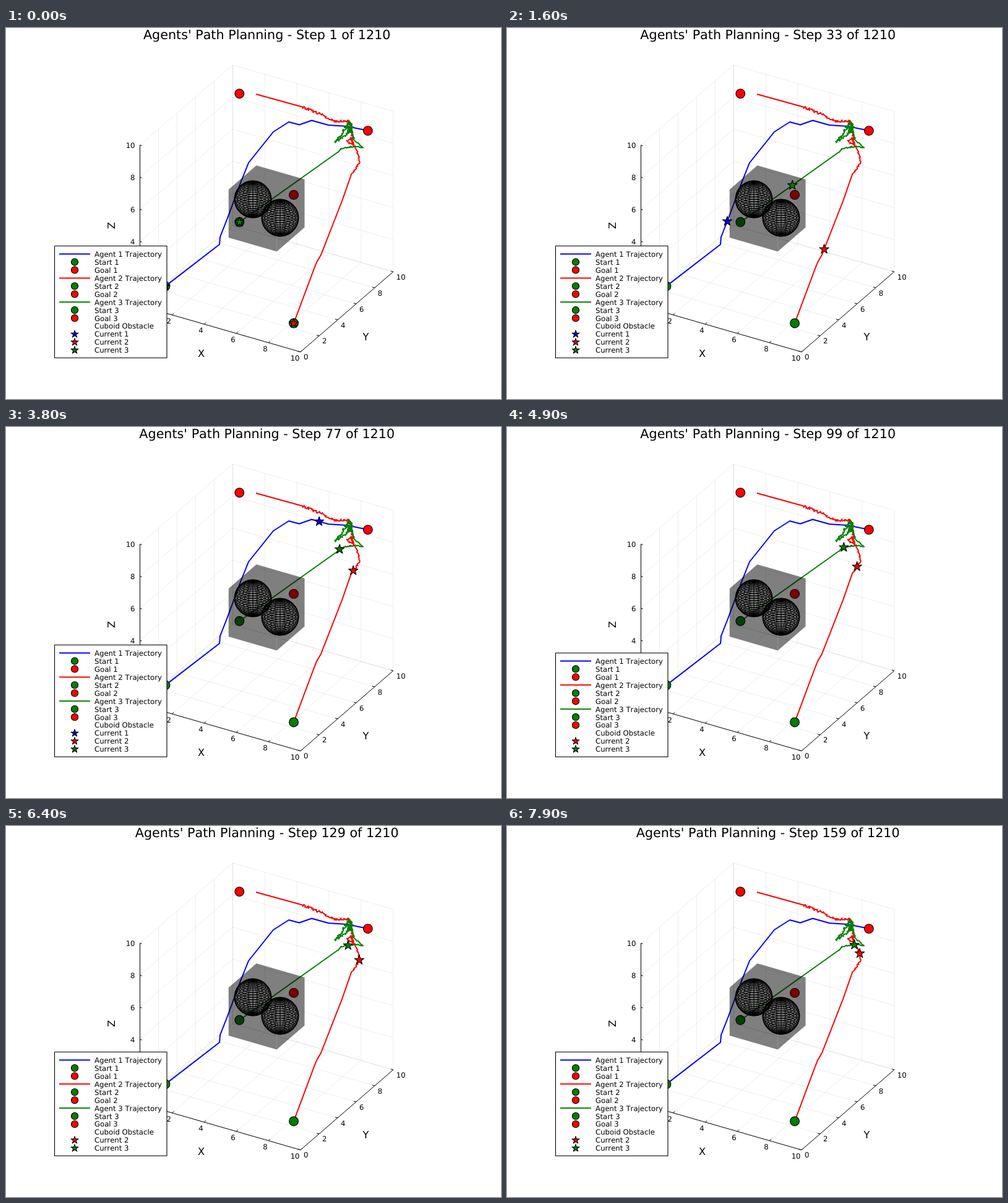
Animation, 800 px wide and 600 px high, one loop 8 s. Source, as an HTML page with a canvas:

```html
<!DOCTYPE html>
<html lang="en">
<head>
<meta charset="utf-8">
<title>Agents' Path Planning</title>
<style>
html, body { margin: 0; width: 100%; height: 100%; overflow: hidden; background: #fff; }
canvas { display: block; }
</style>
</head>
<body>
<canvas width="800" height="600"></canvas>
<script>
const ctx = document.querySelector('canvas').getContext('2d');
const RED = '#f00', GREEN = '#008000', BLUE = '#00f';
const TAU = 2 * Math.PI, ROW = 12.96;

let seed = 11;
const rand = () => (seed = (seed * 16807) % 2147483647) / 2147483647 - 0.5;

// Orthographic view, azimuth 30 and elevation 30 degrees
const project = (x, y, z) => [
  216.5 + 25.95 * x + 14.98 * y,
  449 + 7.49 * x - 12.97 * y - 25.95 * z
];

const parse = text => text.split(' ').map(p => p.split(',').map(Number));
const mix = (a, b, k) => a + (b - a) * k;
const gap = (a, b) => Math.hypot(b[0] - a[0], b[1] - a[1]);

// Follows a coarse route with small random steps aside
function wander(pts, amount) {
  const out = [pts[0]];
  for (let i = 1; i < pts.length; i++) {
    const a = pts[i - 1], b = pts[i];
    const n = amount ? Math.ceil(gap(a, b) / 1.6) : 1;
    for (let k = 1; k <= n; k++)
      out.push(a.map((v, j) => mix(v, b[j], k / n) + rand() * amount));
  }
  return out;
}

// Each section is a route and its roughness; marks are distances covered at STEPS
const STEPS = [1, 33, 55, 159];
const agents = [
  {
    color: BLUE, start: [1, 1, 1], goal: [9, 9, 9], marks: [0, 150, 288, 800],
    sections: [['257.4,417.6 345,350 346,338 357,310 380,248 392,218 432,168 457,152 474,156.5 494,149.5 521,157 551,159 585,166', 0]]
  },
  {
    color: RED, start: [9, 1, 1], goal: [1, 9, 9], marks: [0, 129, 256, 293],
    sections: [
      ['465,477.5 498,389 502,379 509,367 543,280 558,237', 0],
      ['558,237 571,218 570,205 562,190 551,184 557,178', 2.4],
      ['557,178 561,188 556,151 532,151 510,140 480,128', 4],
      ['480,128 404,107', 0]
    ]
  },
  {
    color: GREEN, start: [1, 9, 1], goal: [9, 1, 9], marks: [0, 103, 193, 223],
    sections: [
      ['377.3,314 536,201', 0],
      ['536,201 542,195 558,192 576,193 563,182 558,167', 2.4],
      ['558,167 532,185 556,152 547,161 560,160 552,170 557,153 559,170', 4]
    ]
  }
];
for (const agent of agents) {
  const parts = agent.sections.map(([text, amount]) => [parse(text), amount]);
  agent.guide = parts.flatMap(part => part[0]);
  agent.path = parts.flatMap(part => wander(...part));
}

function locate({ guide, marks }, step) {
  const i = STEPS.findIndex(s => s > step) - 1 >= 0 ? STEPS.findIndex(s => s > step) : STEPS.length - 1;
  let left = mix(marks[i - 1], marks[i], (step - STEPS[i - 1]) / (STEPS[i] - STEPS[i - 1]));
  for (let k = 1; k < guide.length; k++) {
    const a = guide[k - 1], b = guide[k], d = gap(a, b);
    if (left < d) return a.map((v, j) => mix(v, b[j], left / d));
    left -= d;
  }
  return null;
}

function trace(pts) {
  ctx.beginPath();
  pts.forEach(p => ctx.lineTo(...p));
}

function line(pts, color, width) {
  trace(pts);
  ctx.strokeStyle = color;
  ctx.lineWidth = width;
  ctx.stroke();
}

function outline(color) {
  ctx.fillStyle = color;
  ctx.fill();
  ctx.strokeStyle = '#000';
  ctx.lineWidth = 1.1;
  ctx.stroke();
}

function dot(x, y, color, r = 7.4) {
  ctx.beginPath();
  ctx.arc(x, y, r, 0, TAU);
  outline(color);
}

function star(x, y, color, r = 8) {
  ctx.beginPath();
  for (let i = 0; i < 10; i++) {
    const a = i * TAU / 10, d = i % 2 ? r * 0.39 : r;
    ctx.lineTo(x + d * Math.sin(a), y - d * Math.cos(a));
  }
  ctx.closePath();
  outline(color);
}

function label(text, x, y, align = 'left', size = 11.7) {
  ctx.font = size + 'px "DejaVu Sans", sans-serif';
  ctx.fontKerning = 'none';
  ctx.textRendering = 'geometricPrecision';
  ctx.textAlign = align;
  ctx.fillStyle = '#000';
  ctx.fillText(text, x, y);
}

function axes() {
  const edge = (a, b, color = '#000') => line([project(...a), project(...b)], color, 1);
  const grid = (a, b) => edge(a, b, 'rgba(0,0,0,.07)');
  for (let t = 0; t <= 10; t += 2) {
    grid([t, 0, 0], [t, 10, 0]);
    grid([t, 10, 0], [t, 10, 10]);
    grid([0, t, 0], [10, t, 0]);
    grid([0, t, 0], [0, t, 10]);
    grid([0, 0, t], [0, 10, t]);
    grid([0, 10, t], [10, 10, t]);
  }
  edge([0, 0, 0], [10, 0, 0]);
  edge([10, 0, 0], [10, 10, 0]);
  edge([0, 0, 0], [0, 0, 10]);
  for (let t = 0; t <= 10; t += 2) {
    edge([t, 0, 0], [t, 0.2, 0]);
    edge([10, t, 0], [9.85, t, 0]);
    edge([0, 0, t], [0.12, 0, t]);
    const [xx, xy] = project(t, 0, 0), [yx, yy] = project(10, t, 0), [zx, zy] = project(0, 0, t);
    label(t, xx - 1.5, xy + 14, 'right');
    label(t, yx + 5, yy + 12.5);
    label(t, zx - 8, zy + 4.5, 'right');
  }
  label('X', 315.5, 532, 'center', 16.2);
  label('Y', 581.5, 505, 'center', 16.2);
  ctx.save();
  ctx.translate(176, 319.5);
  ctx.rotate(-TAU / 4);
  label('Z', 0, 0, 'center', 16.2);
  ctx.restore();
}

function cuboid(a, b) {
  const faces = [
    [[a, a, a], [b, a, a], [b, a, b], [a, a, b]],
    [[a, a, b], [b, a, b], [b, b, b], [a, b, b]],
    [[b, a, a], [b, b, a], [b, b, b], [b, a, b]]
  ];
  ctx.fillStyle = 'rgba(0,0,0,.5)';
  for (const face of faces) {
    trace(face.map(p => project(...p)));
    ctx.fill();
  }
}

function sphere(cx, cy, n = 24) {
  const [ox, oy] = project(0, 0, 0);
  const at = (lat, lon) => {
    const r = Math.sin(lat);
    const [x, y] = project(r * Math.cos(lon), r * Math.sin(lon), Math.cos(lat));
    return [cx + x - ox, cy + y - oy];
  };
  const steps = Array.from({ length: 41 }, (_, i) => i / 40);
  for (let i = 0; i < n; i++) {
    line(steps.map(s => at(TAU / 2 * i / n, TAU * s)), '#000', 1);
    line(steps.map(s => at(TAU / 2 * s, TAU * i / n)), '#000', 0.7);
  }
}

function legend(places) {
  const rows = agents.flatMap(({ color }, i) => [
    [`Agent ${i + 1} Trajectory`, y => line([[86, y], [136, y]], color, 2)],
    [`Start ${i + 1}`, y => dot(111, y, GREEN, 5.6)],
    [`Goal ${i + 1}`, y => dot(111, y, RED, 5.6)]
  ]);
  rows.push(['Cuboid Obstacle', () => {}]);
  agents.forEach(({ color }, i) => {
    if (places[i]) rows.push([`Current ${i + 1}`, y => star(111, y, color, 6.2)]);
  });
  const top = 534 - ROW * (rows.length + 1);
  ctx.beginPath();
  ctx.rect(78.5, Math.round(top) - 0.5, 181.5, 534 - Math.round(top));
  outline('#fff');
  rows.forEach(([text, mark], i) => {
    const y = top + ROW * (i + 1);
    mark(y);
    label(text, 143, y + 4.3);
  });
}

function draw(step) {
  ctx.fillStyle = '#fff';
  ctx.fillRect(0, 0, 800, 600);
  ctx.lineJoin = 'round';
  axes();
  for (const { path, color, start, goal } of agents) {
    line(path, color, 2);
    dot(...project(...start), GREEN);
    dot(...project(...goal), RED);
  }
  cuboid(3.5, 6.5);
  sphere(399, 277);
  sphere(443, 307);
  const places = agents.map(agent => locate(agent, step));
  places.forEach((p, i) => p && star(...p, agents[i].color));
  legend(places);
  label(`Agents' Path Planning - Step ${step} of 1210`, 421.7, 18, 'center', 20.7);
}

let shown = 0;
function tick() {
  const step = 1 + 2 * Math.floor(performance.now() % 8000 / 100);
  if (step !== shown) draw(shown = step);
  requestAnimationFrame(tick);
}
tick();
</script>
</body>
</html>
```
